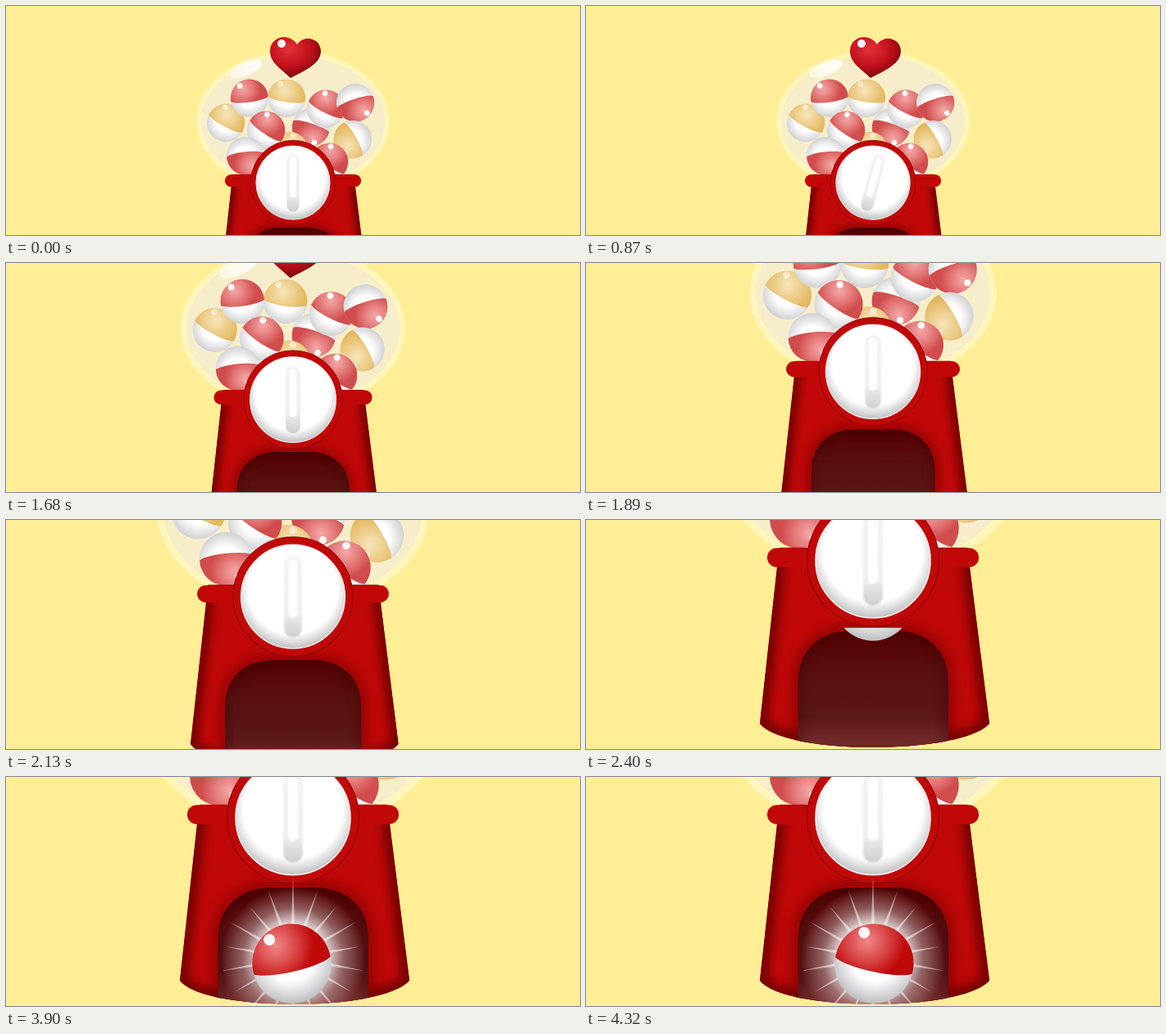
Write an HTML page that moves like this. It is 700 px wide and 280 px high and loops after 5400 ms.

```html
<!DOCTYPE html>
<html lang="en">
<head>
<meta charset="utf-8">
<title>Capsule machine</title>
<style>
  html, body { margin: 0; width: 100%; height: 100%; overflow: hidden; background: #ffee95; }
  svg { display: block; width: 100vw; height: 100vh; }
</style>
</head>
<body>
<svg viewBox="0 0 700 280">
  <defs>
    <radialGradient id="red" gradientUnits="userSpaceOnUse" cx="-14" cy="-26" r="54">
      <stop offset="0" stop-color="#f08888"/><stop offset=".4" stop-color="#dc5050"/><stop offset=".85" stop-color="#c00a0a"/>
    </radialGradient>
    <radialGradient id="gold" gradientUnits="userSpaceOnUse" cx="-8" cy="-20" r="52">
      <stop offset="0" stop-color="#f3dca0"/><stop offset="1" stop-color="#d99c22"/>
    </radialGradient>
    <radialGradient id="white" gradientUnits="userSpaceOnUse" cx="0" cy="-8" r="57">
      <stop offset=".5" stop-color="#fff"/><stop offset="1" stop-color="#bdbdc0"/>
    </radialGradient>
    <radialGradient id="heart" cx=".38" cy=".3" r=".75">
      <stop offset="0" stop-color="#e2323a"/><stop offset=".55" stop-color="#c0101a"/><stop offset="1" stop-color="#70060c"/>
    </radialGradient>
    <linearGradient id="shine" x1="0" x2="1">
      <stop offset="0" stop-color="#fff" stop-opacity=".5"/><stop offset="1" stop-color="#fff" stop-opacity=".95"/>
    </linearGradient>
    <linearGradient id="cave" x1="0" y1="0" x2="0" y2="1">
      <stop offset="0" stop-color="#540000"/><stop offset=".35" stop-color="#5a1010"/><stop offset=".7" stop-color="#5c1717"/><stop offset="1" stop-color="#7c3232"/>
    </linearGradient>
    <radialGradient id="disc" cx=".5" cy=".43" r=".58">
      <stop offset=".74" stop-color="#fff"/><stop offset="1" stop-color="#bcbcbc"/>
    </radialGradient>
    <linearGradient id="knob" x1="0" y1="0" x2="0" y2="1">
      <stop offset="0" stop-color="#f3f3f3"/><stop offset=".7" stop-color="#efefef"/><stop offset="1" stop-color="#cecece"/>
    </linearGradient>
    <radialGradient id="glow">
      <stop offset=".42" stop-color="#fff" stop-opacity=".95"/><stop offset=".7" stop-color="#fff" stop-opacity=".33"/><stop offset="1" stop-color="#fff" stop-opacity="0"/>
    </radialGradient>
    <filter id="soft" x="-20%" y="-20%" width="140%" height="140%"><feGaussianBlur stdDeviation="7"/></filter>
    <filter id="slight" x="-20%" y="-20%" width="140%" height="140%"><feGaussianBlur stdDeviation="1"/></filter>
    <path id="body" d="M236 34 L233 58 L212 249 C240 288 460 288 492 249 L468 58 L465 34Z"/>
    <path id="arch" d="M258.500 285 V199 C258.500 155 290 135.500 324 135.500 H377 C411 135.500 442 155 442 199 V285Z"/>
    <clipPath id="inBody"><use href="#body"/></clipPath>
    <clipPath id="inArch"><use href="#arch"/></clipPath>
    <clipPath id="chute"><rect x="200" y="132" width="300" height="200"/></clipPath>
  </defs>

  <g id="machine">
    <g transform="translate(350 46) scale(1.554) translate(-350 -213.5)">
      <ellipse cx="350" cy="141" rx="118" ry="86" fill="#fff6bb"/>
      <ellipse cx="350" cy="141" rx="112" ry="80" fill="#f2e8b6"/>
      <g id="balls"></g>
      <ellipse cx="350" cy="141" rx="112" ry="80" fill="#fff" opacity=".27"/>
      <ellipse cx="292.500" cy="77" rx="21" ry="8" transform="rotate(-22 292.500 77)" fill="url(#shine)"/>
      <path fill="url(#heart)" d="M347 88 C336 77 322 70 322 55 C322 44 331 38 339 38 C346 38 352 42 355 47 C359 41 366 39 371 40 C380 42 384 48 384 56 C383 72 362 80 347 88Z"/>
      <circle cx="336" cy="46" r="5" fill="#fff" opacity=".95"/>
    </g>

    <use href="#body" fill="#c00808"/>
    <g clip-path="url(#inBody)">
      <use href="#body" fill="none" stroke="#6a0000" stroke-width="17" filter="url(#soft)"/>
      <use href="#arch" fill="none" stroke="#700000" stroke-width="14" opacity=".6" filter="url(#soft)"/>
      <use href="#arch" fill="url(#cave)"/>
      <g clip-path="url(#inArch)">
        <use href="#arch" fill="none" stroke="#300" stroke-width="7" opacity=".6" filter="url(#soft)"/>
      </g>
    </g>
    <rect x="221" y="34.500" width="258" height="23.500" rx="11.750" fill="#c00808"/>
    <circle cx="350" cy="50" r="80.500" fill="#c00808" stroke="#920404" stroke-width="1.200"/>
    <g id="dial">
      <circle cx="350" cy="50" r="70" fill="url(#disc)" stroke="#eee" stroke-width="1.500"/>
      <rect x="338" y="-5" width="24" height="110" rx="12" fill="url(#knob)" filter="url(#slight)"/>
      <rect x="344" y="0" width="12" height="78" rx="5" fill="#fff" filter="url(#slight)"/>
    </g>

    <g id="burst" transform="translate(350 222)"></g>
    <g clip-path="url(#chute)"><g id="prize"></g></g>
  </g>
</svg>
<script>
const LOOP = 5400, STEP = 30, LAST = 4320;
const ZOOM = 1.554;
const $ = id => document.getElementById(id);

// Capsule of radius 48 around the origin, coloured upper half.
const capsule = color => `
  <circle r="48" fill="url(#white)"/>
  <path d="M-47.900 2 A48 48 0 1 1 47.900 2 C32 12 -32 12 -47.900 2Z" fill="url(#${color})"/>
  <circle cx="-20" cy="-35" r="7" fill="#fff" opacity="${color === 'gold' ? .5 : .92}"/>`;

// x, y, tilt, colour; back to front
const pile = [
  [372, 148, 198, 'red'], [345, 177, 45, 'gold'], [268, 143, 28, 'gold'],
  [342, 113, 8, 'gold'], [297, 113, -8, 'red'], [317, 152, 34, 'red'],
  [390, 126, 27, 'red'], [426, 118, 162, 'red'], [423, 163, -120, 'gold'],
  [292, 183, 174, 'red'], [394, 191, 36, 'red']
];
$('balls').innerHTML = pile.map(([x, y, tilt, color]) =>
  `<g transform="translate(${x} ${y}) rotate(${tilt}) scale(.48)">${capsule(color)}</g>`).join('');
$('prize').innerHTML = capsule('red');

let rays = '';
for (let i = 0; i < 18; i++) {
  const length = i === 0 ? 100 : i % 2 ? 89 : 82;
  rays += `<path d="M-2.500 -30 L0 ${-length} L2.500 -30Z" transform="rotate(${i * 20})" fill="#fff" opacity=".5"/>`;
}
$('burst').innerHTML = '<circle r="88" fill="url(#glow)" clip-path="url(#lit)"/>'.replace(' clip-path="url(#lit)"', '') + rays;

const progress = (t, from, to) => Math.min(1, Math.max(0, (t - from) / (to - from)));

// Linear interpolation through [time, value] pairs.
function follow(t, keys) {
  let value = keys[0][1];
  for (let i = 1; i < keys.length; i++)
    value += (keys[i][1] - keys[i - 1][1]) * progress(t, keys[i - 1][0], keys[i][0]);
  return value;
}

const drop = [[2370, 84], [2600, 207], [3030, 207], [3120, 203], [3270, 229]];

function draw(t) {
  const grow = (ZOOM - 1) * progress(t, 1380, 2400);
  $('machine').setAttribute('transform',
    `translate(350 ${213.5 - 303 * grow}) scale(${(1 + grow) / ZOOM}) translate(-350 -46)`);

  const turn = 360 * (progress(t, 60, 690) + progress(t, 840, 1578));
  $('dial').setAttribute('transform', `rotate(${turn} 350 50)`);

  $('burst').setAttribute('opacity', progress(t, 2580, 3120));

  const tilt = t < 3060 ? 0 : 13.5 * Math.cos((t - LAST) / 720 * 2 * Math.PI) - 1.3;
  $('prize').setAttribute('transform',
    `translate(${350 + tilt * .11} ${follow(t, drop)}) rotate(${tilt})`);
  $('prize').setAttribute('visibility', t < 2370 ? 'hidden' : 'visible');
}

const start = performance.now();
function tick() {
  const t = Math.max(0, performance.now() - start) % LOOP;
  draw(Math.min(LAST, Math.floor(t / STEP) * STEP));
  requestAnimationFrame(tick);
}
tick();
</script>
</body>
</html>
```
